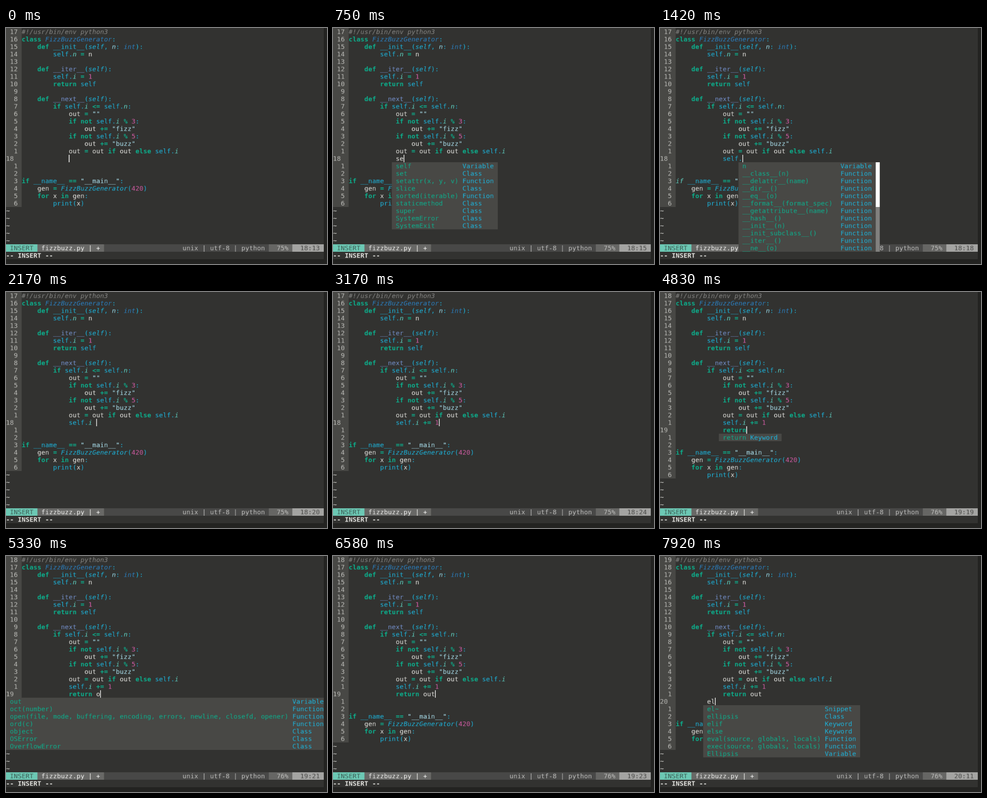
These frames come from a looping animation (600x443 px, 8 s). An HTML page with a canvas:

```html
<!DOCTYPE html>
<html lang="en">
<head>
<meta charset="utf-8">
<title>Editor</title>
<style>
  html, body { margin: 0; width: 100%; height: 100%; overflow: hidden; background: #232321; }
  canvas { display: block; }
</style>
</head>
<body>
<canvas id="screen" width="600" height="443"></canvas>
<script>
// The terminal is drawn on a whole-pixel grid, then shown at two thirds of its size
const CELL_W = 11, CELL_H = 21, BASELINE = 17, COLS = 81, SCALE = 2 / 3, LOOP = 8000;
const view = document.getElementById('screen').getContext('2d');
view.imageSmoothingQuality = 'high';
const terminal = document.createElement('canvas');
terminal.width = 900;
terminal.height = 666;
const ctx = terminal.getContext('2d');

const C = {
  back: '#323230', edge: '#232321', panel: '#484845', text: '#e4e4e0', gutter: '#bcbcb8',
  green: '#0cae8c', cyan: '#1cb4dc', blue: '#2a80c2', slate: '#7490cc', attr: '#62d6c6',
  string: '#aee6f4', pink: '#d45ca6', grey: '#868684', param: '#9adcec'
};

const head = `#!/usr/bin/env python3
class FizzBuzzGenerator:
    def __init__(self, n: int):
        self.n = n

    def __iter__(self):
        self.i = 1
        return self

    def __next__(self):
        if self.i <= self.n:
            out = ""
            if not self.i % 3:
                out += "fizz"
            if not self.i % 5:
                out += "buzz"
            out = out if out else self.i`.split('\n');

const tail = `

if __name__ == "__main__":
    gen = FizzBuzzGenerator(420)
    for x in gen:
        print(x)`.split('\n');

// Each rule: pattern, colour, style
const rules = [
  [/#.*/, C.grey, 'italic'],
  [/".*?"/, C.string],
  [/\b(?:class|def|if|not|else|return|for|in)\b/, C.green, 'bold'],
  [/[+<=%]+/, C.green, 'bold'],
  [/(?<=\.)\w+/, C.attr, 'italic'],
  [/(?<=def.*)\bself\b/, C.cyan, 'italic'],
  [/\bself\b|\bprint\b/, C.cyan],
  [/\b\d+/, C.pink],
  [/__(?:iter|next)__/, C.slate],
  [/__\w+__/, C.cyan],
  [/(?<=class )\w+|\bint\b/, C.blue, 'italic'],
  [/FizzBuzzGenerator/, C.cyan, 'italic'],
  [/\bn(?=:)/, C.param, 'italic'],
  [/[.:(),]/, C.cyan],
  [/\w+/, C.text]
];
const scanner = new RegExp(rules.map(r => `(${r[0].source})`).join('|'), 'g');

// Popup entries: kind letter, then label
const kinds = { V: 'Variable', F: 'Function', K: 'Keyword', C: 'Class', S: 'Snippet' };
const menu = (col, list, extra = {}) =>
  ({ col, items: list.split('|').map(s => [s.slice(2), kinds[s[0]]]), ...extra });

const sMenu = menu(15, 'V self|C set|F setattr(x, y, v)|C slice|F sorted(iterable)|C staticmethod|C str|F sum(iterable)|C super|C StopIteration|C SyntaxError|C SystemError', { thumb: 9 });
const seMenu = menu(15, 'V self|C set|F setattr(x, y, v)|C slice|F sorted(iterable)|C staticmethod|C super|C SystemError|C SystemExit');
const selMenu = menu(15, 'V self');
const dotMenu = menu(20, 'V n|F __class__(n)|F __delattr__(name)|F __dir__()|F __eq__(o)|F __format__(format_spec)|F __getattribute__(name)|F __hash__()|F __init__(n)|F __init_subclass__()|F __iter__()|F __ne__(o)', { width: 24, thumb: 6 });
const iMenu = menu(20, 'V i');
const reMenu = menu(15, 'F repr(obj)|F reversed(sequence)|K return|C RecursionError|C ReferenceError|C ResourceWarning|S ret~|S repr~|C RuntimeError|F round(number)|C range', { thumb: 9 });
const retMenu = menu(15, 'K return|S ret~');
const returnMenu = menu(15, 'K return');
const openCall = 'F open(file, mode, buffering, encoding, errors, newline, closefd, opener)';
const oMenu = menu(0, `V out|F oct(number)|${openCall}|F ord(c)|C object|C OSError|C OverflowError`);
const ouMenu = menu(0, `V out|F oct(number)|${openCall}`);
const outMenu = menu(22, 'V out');
const eMenu = menu(11, 'S el~|C ellipsis|K elif|K else|F eval(source, globals, locals)|F exec(source, globals, locals)|F enumerate(iterable)|C EOFError|C Ellipsis|K except');
const elMenu = menu(11, 'S el~|C ellipsis|K elif|K else|F eval(source, globals, locals)|F exec(source, globals, locals)|V Ellipsis');

// Time, finished lines, line being typed, popup
const first = ['            self.i += 1'];
const second = [...first, '            return out'];
const deep = s => ' '.repeat(12) + s, mid = s => ' '.repeat(8) + s;
const steps = [
  [0, [], deep('')],
  [170, [], deep('s')],
  [250, [], deep('s'), sMenu],
  [750, [], deep('se'), seMenu],
  [1170, [], deep('sel'), selMenu],
  [1250, [], deep('self'), selMenu],
  [1330, [], deep('self.')],
  [1420, [], deep('self.'), dotMenu],
  [1830, [], deep('self.i'), iMenu],
  [2170, [], deep('self.i ')],
  [2420, [], deep('self.i +')],
  [2750, [], deep('self.i +=')],
  [3000, [], deep('self.i += ')],
  [3170, [], deep('self.i += 1')],
  [3830, first, deep('')],
  [4170, first, deep('re'), reMenu],
  [4420, first, deep('ret'), retMenu],
  [4500, first, deep('retu'), returnMenu],
  [4580, first, deep('retur'), returnMenu],
  [4830, first, deep('return'), returnMenu],
  [4920, first, deep('return ')],
  [5330, first, deep('return o'), oMenu],
  [5500, first, deep('return ou'), ouMenu],
  [5670, first, deep('return out'), outMenu],
  [6580, first, deep('return out')],
  [7080, second, mid('')],
  [7750, second, mid('e')],
  [7830, second, mid('e'), eMenu],
  [7920, second, mid('el'), elMenu]
];

function box(col, row, cols, rows, colour) {
  ctx.fillStyle = colour;
  ctx.fillRect(col * CELL_W, row * CELL_H, cols * CELL_W, rows * CELL_H);
}

function write(text, col, row, colour, style = '') {
  ctx.font = `${style} 18px "DejaVu Sans Mono", monospace`;
  ctx.fillStyle = colour;
  [...text].forEach((ch, i) => {
    if (ch !== ' ') ctx.fillText(ch, (col + i) * CELL_W, row * CELL_H + BASELINE);
  });
}

function writeCode(line, row, danglingDot) {
  for (const m of line.matchAll(scanner)) {
    let [, colour, style] = rules[m.slice(1).findIndex(g => g !== undefined)];
    // A bare "self." swallows the next top-level word as its attribute
    if (danglingDot && m.index === 0 && m[0] === 'if') [colour, style] = [C.attr, 'italic'];
    write(m[0], 4 + m.index, row, colour, style);
  }
}

function drawMenu({ col, items, width, thumb }, row) {
  const labelW = width || Math.max(...items.map(i => i[0].length));
  const kindW = Math.max(...items.map(i => i[1].length));
  const total = Math.min(labelW + kindW + 3, COLS - col);
  box(col, row, total, items.length, C.panel);
  items.forEach(([label, kind], i) => {
    write(label, col + 1, row + i, C.green);
    write(kind, col + labelW + 2, row + i, C.cyan);
  });
  if (thumb) {
    box(col + total, row, 1, items.length, '#81817f');
    box(col + total, row, 1, thumb, '#ffffff');
  }
}

function drawStatus(line, col, total) {
  box(0, 29, COLS, 1, '#484847');
  box(0, 29, 8, 1, '#6cc8b4');
  box(8, 29, 17, 1, '#686866');
  box(67, 29, 6, 1, '#666664');
  box(73, 29, 8, 1, '#a4a4a2');
  write('INSERT', 1, 29, '#3c5c54');
  write('fizzbuzz.py | +', 9, 29, '#f2f2f0');
  write('unix | utf-8 | python', 45, 29, '#bebebc');
  write(Math.floor(100 * line / total) + '%', 69, 29, '#c0c0be');
  write(`${line}:${col}`, 75, 29, '#484846');
  write('-- INSERT --', 0, 30, C.text, 'bold');
}

function draw([, done, current, popup]) {
  const lines = [...head, ...done, current, ...tail];
  const active = head.length + done.length;
  ctx.fillStyle = C.edge;
  ctx.fillRect(0, 0, terminal.width, terminal.height);
  box(0, 0, COLS, 31, C.back);
  box(0, 0, 4, lines.length, C.panel);
  lines.forEach((line, row) => {
    const label = row === active ? String(row + 1) : String(Math.abs(row - active)).padStart(3);
    write(label, 0, row, C.gutter);
    writeCode(line, row, popup === dotMenu);
  });
  for (let row = lines.length; row < 29; row++) write('~', 0, row, C.text);
  drawStatus(active + 1, current.length + 1, lines.length);
  ctx.fillStyle = '#f4f4f2';
  ctx.fillRect((4 + current.length) * CELL_W, active * CELL_H, 2, CELL_H);
  if (popup) drawMenu(popup, active + 1);
  view.drawImage(terminal, 0, 0, terminal.width * SCALE, terminal.height * SCALE);
}

let shown = null;
function tick() {
  const t = performance.now() % LOOP;
  const step = steps.findLast(s => s[0] <= t);
  if (step !== shown) draw(shown = step);
  requestAnimationFrame(tick);
}
tick();
</script>
</body>
</html>
```
